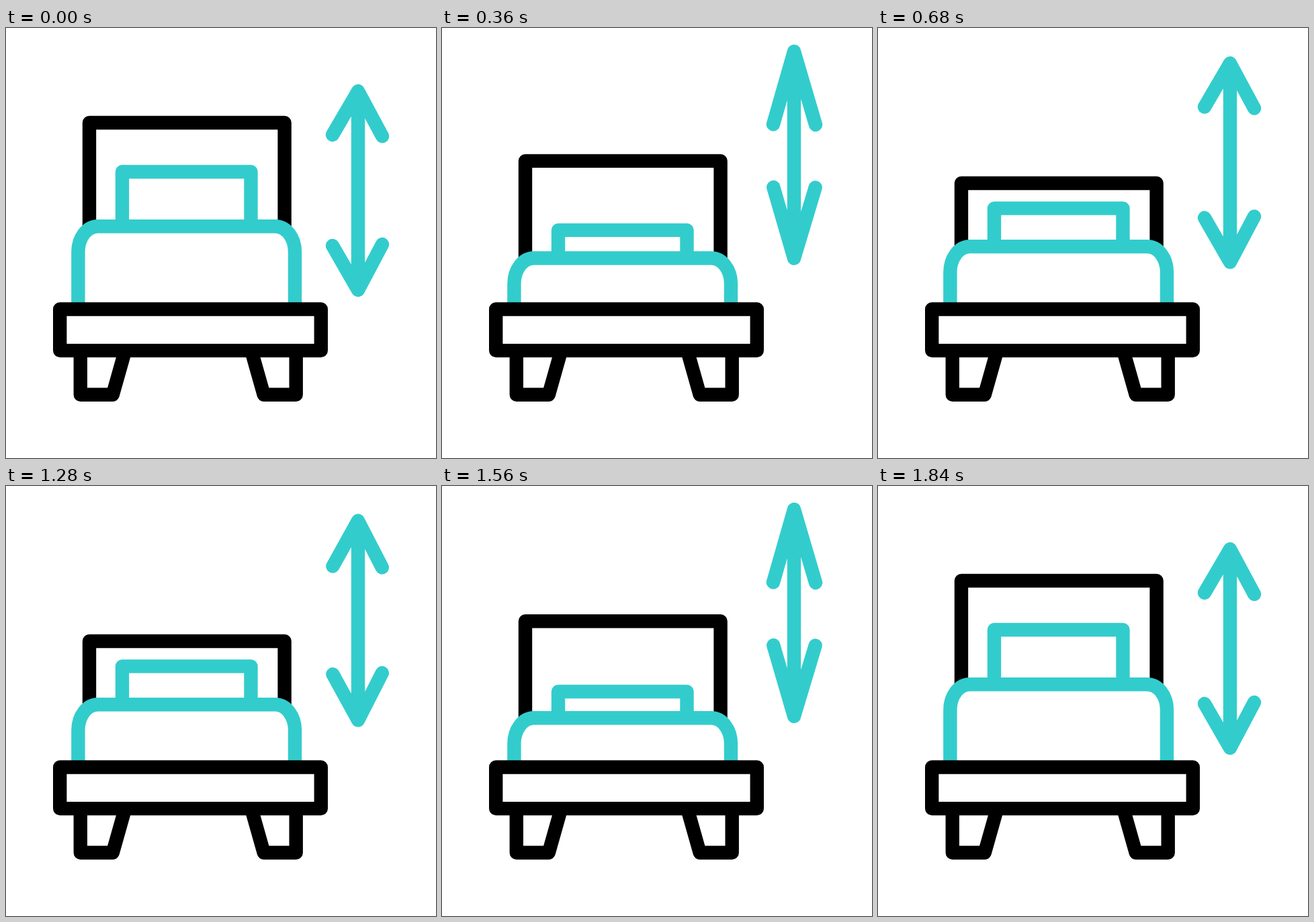
Write an HTML page that moves like this. It is 640 px wide and 640 px high and loops after 2 s.

```html
<!DOCTYPE html>
<html lang="en">
<head>
<meta charset="utf-8">
<title>Bed height</title>
<style>
  html, body { margin: 0; width: 100%; height: 100%; overflow: hidden; background: #fff; }
  svg { display: block; width: 100vw; height: 100vh; }
  path { fill: none; stroke: #000; stroke-width: 20.4; stroke-linecap: round; stroke-linejoin: round; }
  .teal { stroke: #33cccc; }
  .solid { fill: #fff; }
</style>
</head>
<body>
<svg viewBox="0 0 640 640">
  <path id="headboard"/>
  <path id="pillow" class="teal"/>
  <path id="blanket" class="teal solid"/>
  <path d="M110.8 480V545.8H158.8L177.4 480M431.7 480V545.8H383.7L365.1 480"/>
  <path class="solid" d="M80.2 418.5H468.8V480.1H80.2Z"/>
  <path id="arrow" class="teal"/>
</svg>
<script>
const LOOP = 2000, STEP = 40, START = 120, MOVE = 560;

const clamp = (v, lo, hi) => Math.min(hi, Math.max(lo, v));
const mix = (a, b, x) => a + (b - a) * x;
const ease = x => x * x * (3 - 2 * x);
const setPath = (id, d) => document.getElementById(id).setAttribute("d", d);

// Progress 0..1: out after START, back to rest at the time "back"
const progress = (t, back) => clamp(Math.min(t - START, back - t) / MOVE, 0, 1);

// Eased from rest to the middle pose, then to the final one
const swing = (p, rest, mid, end) =>
  p < 0.5 ? mix(rest, mid, ease(2 * p)) : mix(mid, end, ease(2 * p - 1));

function drawBed(p) {
  const head = swing(p, 141, 201.2, 231);
  const pillow = swing(p, 214, 306, 268.4);
  const top = swing(p, 295.2, 345.3, 325.3);
  const side = top + 38;
  setPath("headboard", `M124 ${top}V${head}H414.6V${top}`);
  setPath("pillow", `M173 ${top}V${pillow}H364.5V${top}`);
  setPath("blanket",
    `M107.4 418V${side}A29.2 38 0 0 1 136.6 ${top}H400.8A29.2 38 0 0 1 430 ${side}V418`);
}

// The whole arrow rises while its heads sharpen and relax
function drawArrow(p) {
  const rise = -41.5 * mix(p, ease(p), 0.5);
  const stretch = swing(p, 0, 1, 0);
  const at = (x, y, dx, dy) => `${x + dx * stretch} ${y + rise + dy * stretch}`;
  const tip = at(524, 94, 0, -44.5), foot = at(524, 390, 0, -32);
  setPath("arrow",
    `M${tip}L${foot}` +
    `M${at(486, 159, 7.4, 1.5)}L${tip}L${at(560, 161, -4.2, 0)}` +
    `M${at(486, 324, 7.7, -74)}L${foot}L${at(560, 322, -4.6, -71.5)}`);
}

function render(now) {
  const t = Math.floor((now % LOOP) / STEP) * STEP;
  drawBed(progress(t, 1840));
  drawArrow(progress(t, 1800));
}

const begin = performance.now();
function tick() {
  render(performance.now() - begin);
  requestAnimationFrame(tick);
}
tick();
</script>
</body>
</html>
```
